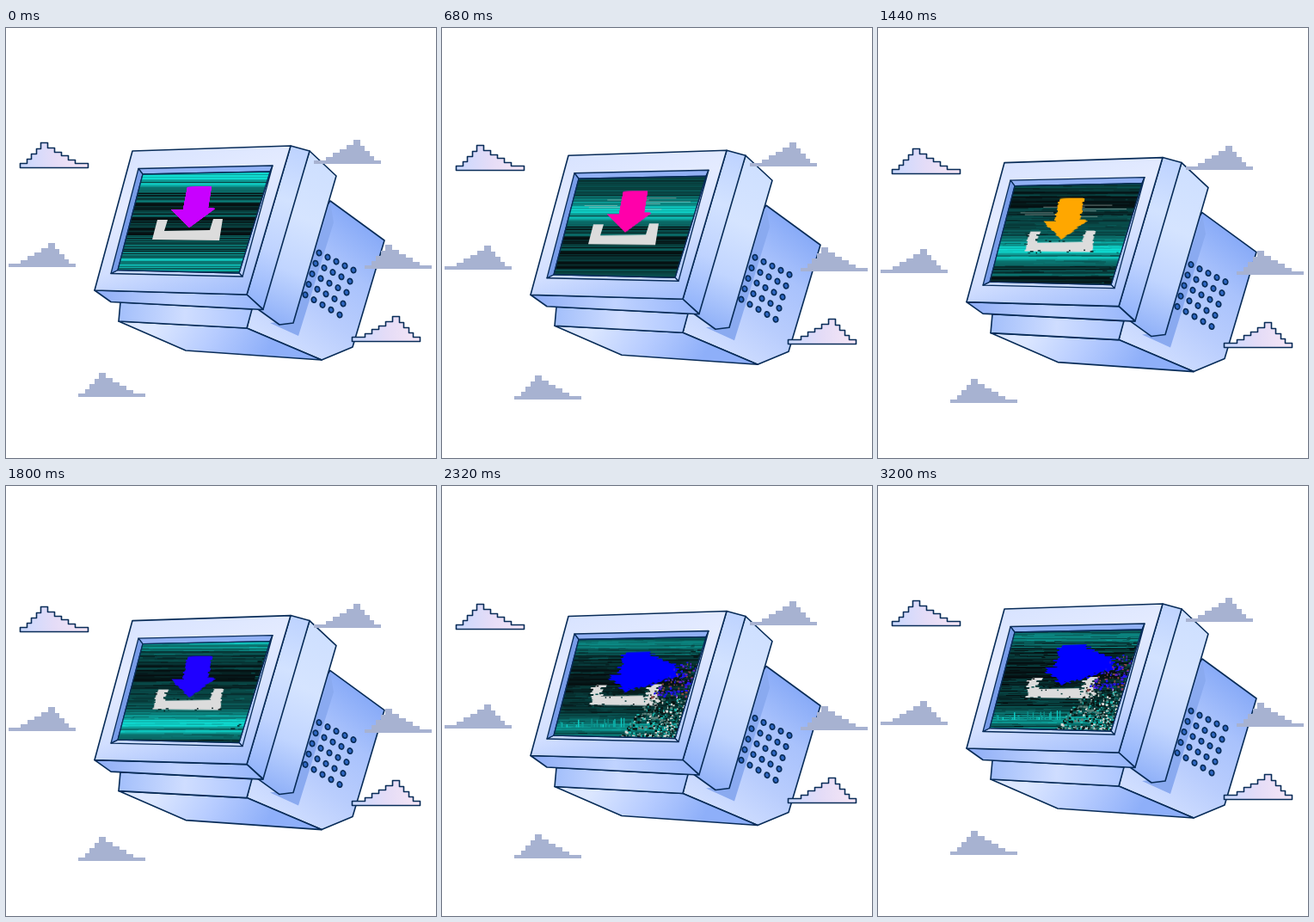
Recreate the animation shown at these times as an HTML page with a canvas. Size 500 by 500 pixels, loop 3.24 s.

```html
<!DOCTYPE html>
<html lang="en">
<head>
<meta charset="utf-8">
<title>Floating computer</title>
<style>
  html, body { margin: 0; width: 100%; height: 100%; overflow: hidden; background: #fff; }
  canvas { display: block; width: 500px; height: 500px; }
</style>
</head>
<body>
<canvas id="stage" width="500" height="500"></canvas>
<script>
const LOOP = 3240, STEP = 40, NAVY = '#082c58';
const SCROLL = 0.05, BAND = 104, FREEZE = 2000;
const ctx = document.getElementById('stage').getContext('2d');
const layer = document.createElement('canvas');
layer.width = layer.height = 500;
const art = layer.getContext('2d');

const GLASS = [[159, 170], [307, 167], [271, 285], [130, 281.5]];
const ARROW = [[192, 211], [206, 211], [211, 185], [239, 184], [235, 209], [243, 210], [213, 232]];
const TRAY = [[176, 223], [188, 223], [184, 236], [237, 235], [241, 222], [252, 222], [248, 247], [170, 246]];

const mix = (a, b, p) => a + (b - a) * p;
const clamp = (v, lo = 0, hi = 1) => Math.max(lo, Math.min(hi, v));
const ramp = (t, from, to) => clamp((t - from) / (to - from));

function rnd(a, b = 0) {
  const s = Math.sin(a * 127.1 + b * 311.7) * 43758.5453;
  return s - Math.floor(s);
}

function shape(c, pts, fill) {
  c.beginPath();
  pts.forEach(([x, y]) => c.lineTo(x, y));
  c.closePath();
  c.fillStyle = fill;
  c.fill();
}

function poly(pts, fill, width = 1.6) {
  shape(ctx, pts, fill);
  ctx.strokeStyle = NAVY;
  ctx.lineWidth = width;
  ctx.lineJoin = 'round';
  ctx.stroke();
}

function rect(x, y, w, h, fill) {
  ctx.fillStyle = fill;
  ctx.fillRect(x, y, w, h);
}

function grad(x0, y0, x1, y1, ...colors) {
  const g = ctx.createLinearGradient(x0, y0, x1, y1);
  colors.forEach((c, i) => g.addColorStop(i / (colors.length - 1), c));
  return g;
}

// Steep stairs up on the left, even stairs down on the right
function stairs(w, h) {
  const pts = [[0, h]];
  let x = 0, y = h;
  const go = (nx, ny) => { pts.push([nx, y], [nx, ny]); x = nx; y = ny; };
  for (let i = 0; i < 5; i++) {
    go(i ? Math.round(2.7 + 5.3 * i) : 0, Math.round(24 - 4.7 * i - 0.33 * i * i));
  }
  for (let i = 0; i < 5; i++) go(32 + 8 * i, Math.round(6 + 4.6 * i));
  go(w, h);
  return pts;
}

function cloud(left, top, flip, outlined) {
  const w = outlined ? 79 : 78, h = outlined ? 29 : 28;
  const inset = outlined ? 0.5 : 0;
  const pts = stairs(w, h).map(([x, y]) => [left + inset + (flip ? w - x : x), top + inset + y]);
  if (outlined) poly(pts, grad(left, 0, left + w, 0, '#c9d9ff', '#e4dcf7', '#f6e6f5'));
  else shape(ctx, pts, '#a7b2d1');
}

function vents() {
  for (let r = 0; r < 5; r++) for (let c = 0; c < 5; c++) {
    ctx.beginPath();
    ctx.ellipse(364 + c * 10 - r * 4, 261.5 + c * 5 + r * (12.2 + c * 0.2), 2.7, 3.2, -0.3, 0, Math.PI * 2);
    ctx.fillStyle = '#2f68c4';
    ctx.fill();
    ctx.lineWidth = 1.7;
    ctx.strokeStyle = NAVY;
    ctx.stroke();
  }
}

function rear() {
  poly([[377, 201], [440, 247], [403, 371], [367, 386], [280, 349], [285, 328]],
    grad(430, 235, 325, 375, '#86a9f7', '#a9c2fc', '#b9cdfd', '#d0deff'));
  shape(ctx, [[377, 203], [381, 226], [340, 358], [307, 343], [334, 340]], '#8aaaf0');
  poly([[131, 341], [280, 349], [367, 386], [209, 375]],
    grad(180, 335, 290, 400, '#dce7ff', '#b7ccff', '#8eaff9'));
  poly([[133, 319], [286, 327], [280, 349], [131, 341]],
    grad(131, 330, 285, 340, '#a3bffb', '#cfddff', '#adc6ff'));
  vents();
}

function housing() {
  poly([[353, 143], [384, 172], [334, 343], [318, 345], [293, 327]],
    grad(375, 165, 305, 340, '#cfe0ff', '#d5e4ff', '#c1d5ff', '#8fb0f8'));
  poly([[331, 137], [353, 143], [299, 327], [280, 310]],
    grad(342, 140, 288, 318, '#bed3ff', '#d2e2ff', '#bfd3ff', '#93b4fb'));
  poly([[103, 305], [280, 310], [299, 327.5], [122, 318.5]],
    grad(103, 308, 299, 320, '#8eadf6', '#c0d3ff', '#96b5fb'));
  poly([[147, 143], [331, 137], [280, 310], [103, 305]],
    grad(170, 135, 225, 320, '#d8e3ff', '#e4ebff', '#d2dfff', '#a4bffc'));
  const rim = [[154, 163.5], [310, 160], [275, 289], [122, 285.5]];
  ['#91b0f4', '#b9cfff', '#c7d8ff', '#789ce8'].forEach((fill, i) => {
    const j = (i + 1) % 4;
    poly([rim[i], rim[j], GLASS[j], GLASS[i]], fill, 1.3);
  });
}

function teal(level) {
  const p = clamp(level / 9);
  return `rgb(${mix(6, 16, p)},${mix(16, 222, p)},${mix(18, 212, p)})`;
}

// One endless striped texture rolls down behind the icon
function scanLines(t, glitch) {
  const roll = Math.min(t, FREEZE) * SCROLL;
  const melt = ramp(t, 1880, 2240);
  rect(120, 160, 200, 135, teal(0));
  for (let y = 164; y < 288; y++) {
    const row = Math.floor(y - roll);
    const wave = Math.cos((row - 276) / BAND * Math.PI * 2);
    const beam = Math.exp(-Math.pow(((row - 276 + BAND * 5.5) % BAND - BAND / 2) / 8, 2));
    const stripe = (rnd(Math.floor(row / 4), 2) - 0.5) * 3.6 + (rnd(row) - 0.5) * 2.4;
    const groove = rnd(row, 9) > 0.82 ? 3 : 0;
    const level = (3.2 + 2.3 * wave + 3 * beam + stripe - groove) * (1 - 0.35 * melt);
    rect(120, y, 200, 1.5, teal(level));
    for (let k = 0; k < Math.round(glitch * 5); k++) {
      const x = 128 + rnd(row, k) * 165;
      rect(x, y, 8 + rnd(k, row) * 40, 1.2, teal(level + (rnd(x, row) - 0.6) * 3));
    }
  }
  if (t < 400 || t > 1500) return;
  for (let k = 0; k < 7; k++) {
    rect(160 + rnd(k, 3) * 100, 192 + k * 2.2, 20 + rnd(3, k) * 45, 1, 'rgba(170,190,184,.6)');
  }
}

// Copies the layer in thin rows, each pushed sideways by the glitch
function slices(glitch) {
  for (let y = 178; y < 252; y += 2) {
    const dx = (rnd(y, 4) - 0.5) * 8 * glitch;
    ctx.drawImage(layer, 125, y, 190, 2, 125 + dx, y, 190, 2);
  }
  art.clearRect(0, 0, 500, 500);
}

function icon(t, glitch) {
  const melt = ramp(t, 1880, 2240);
  shape(art, TRAY, '#dcdcdc');
  slices(glitch);
  for (let k = 0; k < 60 * glitch; k++) {
    rect(168 + rnd(k, 5) * 86, 222 + rnd(k, 6) * 26, 1 + rnd(k, 7) * 3, 1.5,
      rnd(k, 9) > 0.72 ? '#dcdcdc' : teal(rnd(k, 10) * 3));
  }
  const color = `hsl(${t < 1809 ? (287 + t * 0.578) % 360 : 240},100%,50%)`;
  // A shrinking trail smears the arrow to the right
  for (let k = 0; k < 7; k++) {
    const size = 1 - 0.11 * k * melt;
    shape(art, ARROW.map(([x, y]) => [217 + (x - 217) * size + 8.5 * k * melt, 209 + (y - 209) * size]), color);
  }
  slices(glitch);
}

function debris(t, glitch) {
  const melt = ramp(t, 1840, 2240);
  const high = ['#2416ee', '#5a22c8', '#8b4a49', '#0b3934', '#1c12f4'];
  const low = ['#06120f', '#0b3934', '#0b1515', '#1fb9ae', '#5d827c', '#d9d9d6'];
  for (let k = 0; k < 650 * melt; k++) {
    const y = 192 + Math.sqrt(rnd(k, 21)) * 92;
    const x = 306 - (y - 168) * 0.3 - Math.pow(rnd(k, 22), 1.3) * (20 + (y - 190) * 0.5);
    const set = y < 236 ? high : low;
    rect(x, y, 1 + rnd(k, 24) * 2.5, 1 + rnd(k, 25) * 2, set[Math.floor(rnd(k, 23) * set.length)]);
  }
  for (let k = 0; k < 26 * melt; k++) {
    const h = 2 + rnd(k, 32) * 9;
    rect(137 + rnd(k, 31) * 85, 272 - h, 1.5, h, teal(5 + rnd(k, 33) * 4));
  }
  for (let k = 0; k < 45 * glitch; k++) {
    const y = 174 + rnd(k, 41) * 108;
    rect(304 - (y - 170) * 0.3 - rnd(k, 42) * 14, y, 2 + rnd(k, 43) * 4, 1.5, teal(rnd(k, 44) * 4));
  }
}

function screen(t) {
  const glitch = 0.33 * ramp(t, 760, 1160) + 0.67 * ramp(t, 1880, 2240);
  ctx.save();
  shape(ctx, GLASS, teal(0));
  ctx.clip();
  scanLines(t, glitch);
  icon(t, glitch);
  debris(t, glitch);
  ctx.restore();
  poly(GLASS, 'transparent', 1.3);
}

function draw(t) {
  const bob = (1 - Math.cos(t / LOOP * Math.PI * 2)) / 2;
  rect(0, 0, 500, 500, '#fff');
  ctx.save();
  ctx.translate(0, bob * 14);
  rear();
  housing();
  screen(t);
  ctx.restore();
  ctx.save();
  ctx.translate(0, Math.round(bob * 7));
  cloud(16, 133, false, true);
  cloud(402, 335, true, true);
  cloud(3, 250, true, false);
  cloud(358, 130, true, false);
  cloud(417, 252, false, false);
  cloud(84, 401, false, false);
  ctx.restore();
}

const start = performance.now();
function tick() {
  const t = (performance.now() - start) % LOOP;
  draw(Math.floor(t / STEP) * STEP);
  requestAnimationFrame(tick);
}
tick();
</script>
</body>
</html>
```
